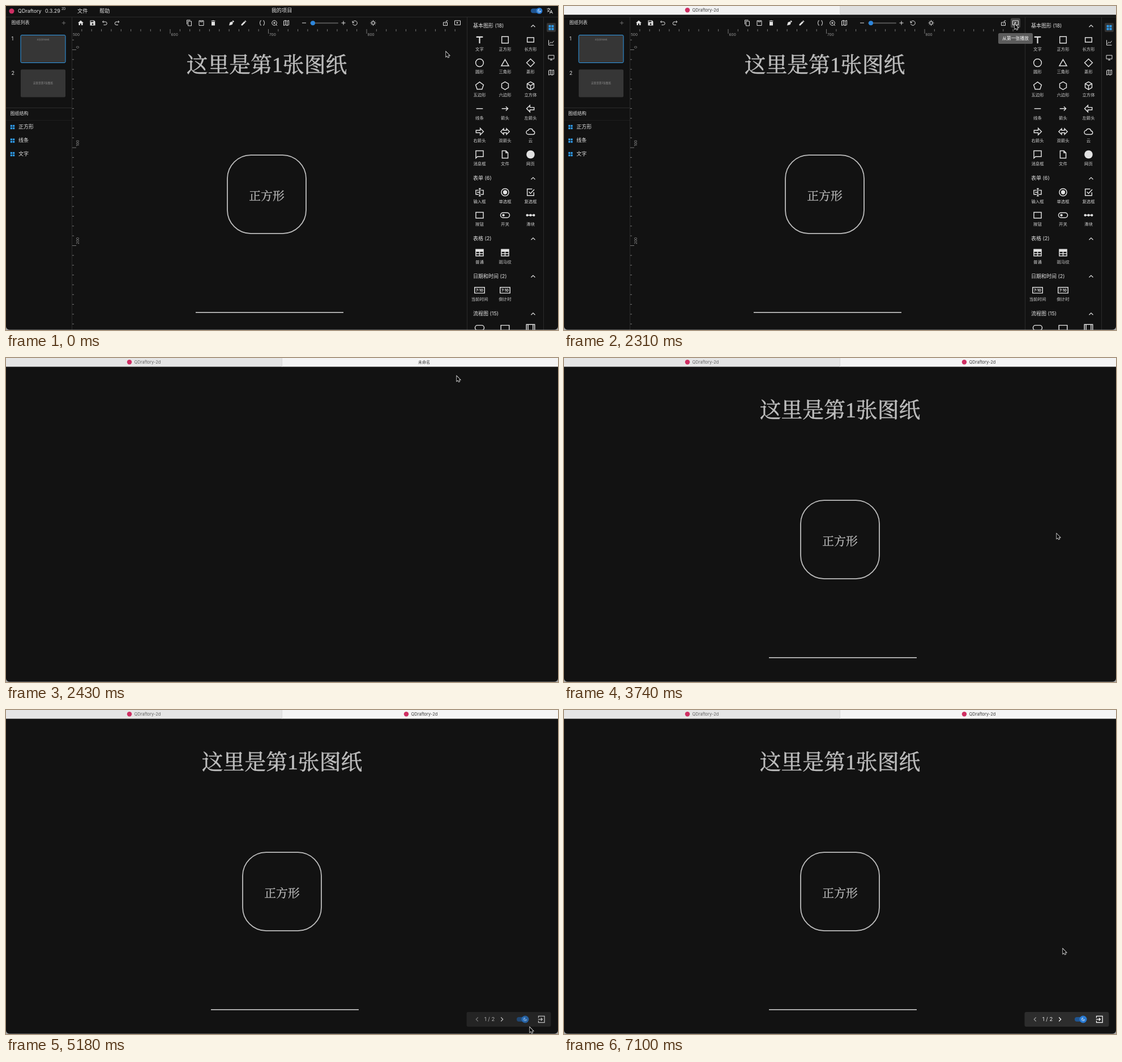
An HTML page with a canvas for the animation above (8000 ms loop, 975 by 574 pixels).

```html
<!DOCTYPE html>
<html lang="zh-CN">
<head>
<meta charset="utf-8">
<style>
html, body { margin: 0; width: 100%; height: 100%; overflow: hidden; background: #121212; }
canvas { display: block; }
</style>
</head>
<body>
<canvas id="stage" width="975" height="574"></canvas>
<script>
const ctx = document.getElementById('stage').getContext('2d');
const LOOP = 8000, W = 975, H = 574, TAB_HEIGHT = 15.6;
const SANS = 'Inter, "Noto Sans CJK SC", "Noto Sans CJK", sans-serif';
const SERIF = '"Liberation Serif", "Noto Serif CJK SC", "Noto Sans CJK SC", serif';
const APP = 'QDraftory', BRAND = '#cf2f63', BG = '#121212', LINE = '#2b2b2b', INK = '#e2e2e2', BLUE = '#2f9bea';

const pill = 'M7 6h10a6 6 0 0 1 0 12H7a6 6 0 0 1 0-12z';
const hexagon = 'M12 2.5l8.2 4.75v9.5L12 21.5l-8.2-4.75v-9.5z';
const ring = r => `M${12 - r} 12a${r} ${r} 0 1 0 ${2 * r} 0a${r} ${r} 0 1 0 ${-2 * r} 0`;

// Icons on a 24-unit grid; one name may have both a stroked and a filled part.
const OUTLINE = {
  undo: 'M8 4L4 8l4 4M4 8h10a5.5 5.5 0 0 1 0 11H8',
  redo: 'M16 4l4 4-4 4M20 8H10a5.5 5.5 0 0 0 0 11h6',
  copy: 'M16 2H4v15M8 6h12v16H8z',
  paste: 'M4 4h16v17H4zM8 4v4h8V4',
  braces: 'M9 4H7a2 2 0 0 0-2 2v4l-2 2 2 2v4a2 2 0 0 0 2 2h2M15 4h2a2 2 0 0 1 2 2v4l2 2-2 2v4a2 2 0 0 1-2 2h-2',
  zoom: ring(8.5) + 'M12 8v8M8 12h8M18 18l4 4',
  map: 'M3 5l6-2 6 2 6-2v16l-6 2-6-2-6 2zM9 3v16M15 5v16',
  minus: 'M5 12h14',
  plus: 'M5 12h14M12 5v14',
  refresh: 'M4 5v6h6M5 10a8 8 0 1 1 0 5',
  gear: ring(5) + 'M12 2v5M12 17v5M2 12h5M17 12h5M5 5l3.5 3.5M15.5 15.5L19 19M5 19l3.5-3.5M15.5 8.5L19 5',
  unlock: 'M5 10h14v11H5zM15 10V6a3.5 3.5 0 0 1 6-1M12 14v3',
  present: 'M2 4h20v15H2z',
  translate: 'M2 5h12M8 2v3M12 5c-1 5-5 9-9 11M4 9c2 4 5 6 8 7M12 22l5-12 5 12M14 18h6',
  chart: 'M3 3v18h18M6 16l5-6 4 4 6-8',
  monitor: 'M2 4h20v13H2zM8 21h8M12 17v4',
  exit: 'M4 8V3h17v18H4v-5M3 12h12M11 8l4 4-4 4',
  up: 'M6 15l6-6 6 6', left: 'M15 6l-6 6 6 6', right: 'M9 6l6 6-6 6',
  moon: 'M11 4a8 8 0 1 0 9 9a5.5 5.5 0 0 1-9-9z',
  square: 'M4 4h16v16H4z', oblong: 'M4 6.5h16v11H4z', circle: ring(9.5),
  triangle: 'M12 4L21 19.5H3z', diamond: 'M12 2.5l9.5 9.5-9.5 9.5L2.5 12z',
  pentagon: 'M12 3l9.5 7-3.6 10.5H6.1L2.5 10z', hexagon,
  cube: hexagon + 'M3.8 7.2L12 12l8.2-4.8M12 12v9.5',
  line: 'M4 12h16', arrow: 'M4 12h15M14 7l5 5-5 5',
  arrowLeft: 'M2.5 12l8-8v5h10v6h-10v5z', arrowRight: 'M21.5 12l-8-8v5h-10v6h10v5z',
  arrowBoth: 'M1.5 12l7-7v4h7V5l7 7-7 7v-4h-7v4z',
  cloud: 'M7 19a5 5 0 0 1-.5-10A6 6 0 0 1 18 10.5a4.3 4.3 0 0 1 .5 8.5z',
  message: 'M3 3h18v14H7l-4 4z', file: 'M5 3h9l5 5v13H5zM14 3v5h5',
  input: 'M10 7H3v10h7M15 7h6v10h-6M12.5 3v18M10 3h5M10 21h5M6 12h6',
  radio: ring(9), check: 'M20 12v8H4V4h12M8 11l4 4 9-10', button: 'M3 5h18v14H3z',
  toggle: pill, slider: 'M2 12h20', table: 'M3 4h18v16H3zM3 9h18M12 9v11M3 14.5h18',
  clock: 'M0 5h24v14H0z', terminal: pill, process: 'M2 6h20v12H2z',
  subprocess: 'M2 4h20v16H2zM6 4v16M18 4v16'
};
const SOLID = {
  home: 'M10 20v-6h4v6h5v-8h3L12 3 2 12h3v8z',
  save: 'M3 3h14l4 4v14H3zM5 5v4h10V5zM9 16a3 3 0 1 0 6 0a3 3 0 1 0-6 0',
  trash: 'M6 8h12v13H6zM5 4h4l1-1h4l1 1h4v2H5z',
  nib: 'M3 21l3-11 7-3 4 4-3 7zM14 6l3-3 4 4-3 3z',
  pencil: 'M3 21v-4L14 6l4 4L7 21zM15 5l2-2 4 4-2 2z',
  present: 'M9 8v7l6-3.5z',
  grid: 'M3 3h8v8H3zM13 3h8v8h-8zM3 13h8v8H3zM13 13h8v8h-8z',
  text: 'M4 3.5v3h6.5v14h3v-14H20v-3z', web: ring(10), radio: ring(5),
  toggle: 'M5 12a3 3 0 1 0 6 0a3 3 0 1 0-6 0',
  slider: 'M1 12a3 3 0 1 0 6 0a3 3 0 1 0-6 0M9 12a3 3 0 1 0 6 0a3 3 0 1 0-6 0M17 12a3 3 0 1 0 6 0a3 3 0 1 0-6 0',
  table: 'M3 4h18v5H3z'
};

const PALETTE = [
  [35.5, '基本图形 (18)', 'text 文字 square 正方形 oblong 长方形 circle 圆形 triangle 三角形 diamond 菱形 ' +
    'pentagon 五边形 hexagon 六边形 cube 立方体 line 线条 arrow 箭头 arrowLeft 左箭头 arrowRight 右箭头 ' +
    'arrowBoth 双箭头 cloud 云 message 消息框 file 文件 web 网页'],
  [305.5, '表单 (6)', 'input 输入框 radio 单选框 check 复选框 button 按钮 toggle 开关 slider 滑块'],
  [412.5, '表格 (2)', 'table 普通 table 斑马纹'],
  [479, '日期和时间 (2)', 'clock 当前时间 clock 倒计时'],
  [545.5, '流程图 (15)', 'terminal 开始 process 流程 subprocess 子流程']
];
const TOOLS = { home: 132, save: 153, undo: 174.5, redo: 196, copy: 323.5, paste: 345, trash: 366, nib: 398.5,
  pencil: 420, braces: 452.5, zoom: 474, map: 495, minus: 526.5, plus: 596, refresh: 616, gear: 648.5,
  unlock: 776, present: 797.5 };

// Pointer track: time, x, y
const TRACK = [[0, 777, 81], [60, 777, 81], [560, 796, 32], [2520, 796, 32], [3100, 888, 276], [3340, 869, 296],
  [3550, 869, 296], [3740, 870, 311], [3950, 874, 375], [4150, 888, 448], [4350, 911, 520], [4670, 925, 562],
  [5630, 925, 562], [5660, 925, 561], [5840, 925, 561], [6640, 925, 501], [7100, 881, 423], [LOOP, 881, 423]];

const ramp = (t, from, to) => Math.min(1, Math.max(0, (t - from) / (to - from)));

function rect(x, y, w, h, fill, radius = 0, stroke) {
  ctx.beginPath();
  ctx.roundRect(x, y, w, h, radius);
  if (fill) { ctx.fillStyle = fill; ctx.fill(); }
  if (stroke) { ctx.strokeStyle = stroke; ctx.stroke(); }
}
function disc(x, y, r, fill) {
  ctx.beginPath();
  ctx.arc(x, y, r, 0, 7);
  ctx.fillStyle = fill;
  ctx.fill();
}
function text(str, x, y, size, color = INK, align = 'left', family = SANS, weight = 400) {
  ctx.font = `${weight} ${size}px ${family}`;
  ctx.textAlign = align;
  ctx.textBaseline = 'middle';
  ctx.fillStyle = color;
  ctx.fillText(str, x, y);
}
function icon(name, x, y, size, color = INK) {
  ctx.save();
  ctx.translate(x - size / 2, y - size / 2);
  ctx.scale(size / 24, size / 24);
  ctx.lineWidth = 2;
  ctx.strokeStyle = ctx.fillStyle = color;
  if (OUTLINE[name]) ctx.stroke(new Path2D(OUTLINE[name]));
  if (SOLID[name]) ctx.fill(new Path2D(SOLID[name]), 'evenodd');
  ctx.restore();
}
function toggle(x, y, r) {
  rect(x - 15, y - 4, 16, 8, '#1f5591', 4);
  disc(x, y, r, '#2a7bd3');
  icon('moon', x, y, 8, '#fff');
}

function drawing(dx, dy) {
  const color = '#bebebe';
  // A hairline stroke gives the serif text its sturdier weight.
  const caption = (str, y, size) => {
    text(str, 460.5, y, size, color, 'center', SERIF, 500);
    ctx.lineWidth = size / 70;
    ctx.strokeText(str, 460.5, y);
  };
  ctx.save();
  ctx.translate(dx, dy);
  ctx.strokeStyle = color;
  ctx.lineJoin = 'round';
  caption('这里是第1张图纸', 107.5, 37.8);
  caption('正方形', 339, 20.8);
  ctx.lineWidth = 1.8;
  rect(391, 264.1, 139, 139, null, 41.6, color);
  rect(335, 542, 261, 1.8, color);
  ctx.restore();
}

function rulers() {
  const step = 17.35, color = '#777';
  for (let n = 0; n < 40; n++) {
    const x = 116 + n * step;
    if (x < 812) rect(x, 41, 1, n % 10 ? 4 : 8, color);
    if (n % 10 == 0) text(500 + n * 10, x + 2, 51.5, 6.5, '#999');
  }
  for (let n = -1; n < 29; n++) {
    const y = 77 + n * step;
    rect(116, y, n % 10 ? 4 : 8, 1, color);
    if (n % 10) continue;
    ctx.save();
    ctx.translate(127, y - 2);
    ctx.rotate(-Math.PI / 2);
    text(n * 10, 0, 0, 6.5, '#999');
    ctx.restore();
  }
}

function sidebar() {
  text('图纸列表', 9.5, 30, 8);
  icon('plus', 102, 30, 11, '#777');
  ctx.lineWidth = 1;
  [[51, '1', 60, 3], [112, '2', 137, 4.6]].forEach(([y, n, ty, size], i) => {
    text(n, 9.5, y + 7, 9);
    rect(26, y + .5, 79, 49, '#363636', 2, i ? null : BLUE);
    text(`这里是第${n}张图纸`, 65.5, ty, size, '#8b8b8b', 'center');
  });
  text('图纸结构', 7.5, 191, 8);
  ['正方形', '线条', '文字'].forEach((name, i) => {
    icon('grid', 11.5, 214.5 + i * 24, 10, BLUE);
    text(name, 22, 214.5 + i * 24, 9);
  });
}

function palette() {
  for (const [top, title, items] of PALETTE) {
    text(title, 825, top, 9);
    icon('up', 931, top, 14);
    const words = items.split(' ');
    for (let i = 0; i < words.length / 2; i++) {
      const x = 836.5 + i % 3 * 45, y = top + 24.5 + Math.floor(i / 3) * 40.6;
      icon(words[2 * i], x, y, 17.5);
      if (words[2 * i] == 'clock') text('7:10', x, y + .3, 6.5, INK, 'center', SANS, 700);
      text(words[2 * i + 1], x, y + 16.5, 7.4, '#d2d2d2', 'center');
    }
  }
}

function editor(t) {
  rect(0, 0, W, H, BG);
  disc(10, 9, 4.5, BRAND);
  text(APP, 21, 9, 9);
  text('0.3.29', 69, 9, 9);
  text('2D', 98, 5, 5.5);
  text('文件', 126, 9, 9.3);
  text('帮助', 165, 9, 9.3);
  text('我的项目', 487, 8, 9.2, INK, 'center');
  toggle(942, 8.5, 5.5);
  icon('translate', 960.5, 8.5, 12);

  rulers();
  drawing(0, 0);
  if (t > 480) rect(789, 21.5, 17, 17, '#444', 2);
  for (const name in TOOLS) icon(name, TOOLS[name], 30, 12);
  rect(537, 29.3, 50, 2, '#555', 1);
  disc(542, 30.3, 4, '#2d86dc');
  sidebar();
  palette();

  rect(0, 19, W, 1, LINE);
  rect(0, 180, 116, 1, LINE);
  rect(0, 202, 116, 1, '#1e1e1e');
  for (const x of [116, 814, 949]) rect(x, 20, 1, H, LINE);
  rect(955, 30, 16, 16, '#333', 2);
  ['grid', 'chart', 'monitor', 'map'].forEach((name, i) =>
    icon(name, 963, 38.3 + i * 26.5, 12, i ? INK : BLUE));

  ctx.globalAlpha = ramp(t, 600, 800);
  rect(767, 48, 61, 19, '#5c5c5c', 2.5);
  text('从第一张播放', 797.5, 57.5, 7.8, '#fff', 'center');
  ctx.globalAlpha = 1;
}

function tabs(t) {
  const switched = t >= 2340;
  rect(0, 0, 487, TAB_HEIGHT, switched ? '#e5e5e5' : '#f2f2f2');
  rect(487, 0, 488, TAB_HEIGHT, switched ? '#f4f4f4' : '#dedede');
  rect(487, 0, 1, TAB_HEIGHT, '#dadada');
  const label = (x, color) => {
    disc(x, 7.3, 4.2, BRAND);
    text(APP + '-2d', x + 8.5, 7.3, 7.5, color);
  };
  label(218, switched ? '#626262' : '#3c3c3c');
  if (!switched) return;
  if (t < 2520) text('未命名', 738.5, 7.5, 7.2, '#3c3c3c', 'center');
  else label(707, '#3c3c3c');
}

function pager(t) {
  ctx.globalAlpha = .7 * ramp(t, 4380, 4670) + .3 * ramp(t, 5840, 6140);
  rect(813.5, 535, 149, 26, '#2d2d2d', 3);
  icon('left', 832, 548, 14, '#999');
  text('1 / 2', 854, 548.5, 9.5, INK, 'center');
  icon('right', 876, 548, 14, '#fff');
  toggle(917, 548, 6.5);
  icon('exit', 945.5, 548, 15, '#fff');
  ctx.globalAlpha = 1;
}

function preview(t) {
  const blank = t < 2430;
  rect(0, 0, W, H, blank ? '#fefefe' : BG);
  if (blank) rect(0, 16, W, 1, '#d2d2d2');
  if (t >= 2760) drawing(27, -12);
  pager(t);
}

// Monotone cubic interpolation keeps the pointer from overshooting its rests.
function along(t, axis) {
  const i = Math.max(1, TRACK.findIndex(key => key[0] > t));
  const slope = k => (TRACK[k + 1][axis] - TRACK[k][axis]) / (TRACK[k + 1][0] - TRACK[k][0]);
  const tangent = k => {
    if (k == 0 || k == TRACK.length - 1) return 0;
    const a = slope(k - 1), b = slope(k);
    return a * b > 0 ? 2 * a * b / (a + b) : 0;
  };
  const [p, q] = [TRACK[i - 1], TRACK[i]], d = q[0] - p[0], u = (t - p[0]) / d, v = 1 - u;
  return p[axis] * v * v * (1 + 2 * u) + q[axis] * u * u * (3 - 2 * u)
    + d * u * v * (tangent(i - 1) * v - tangent(i) * u);
}

const ARROW = new Path2D('M0 0v8.6l2-1.8 1.4 3.1 1.5-.6-1.4-3h2.6z');
function pointer(t) {
  ctx.save();
  ctx.translate(along(t, 1) + .2, along(t, 2) + .2);
  ctx.lineWidth = 1.5;
  ctx.strokeStyle = '#f4f4f4';
  ctx.stroke(ARROW);
  ctx.fillStyle = '#000';
  ctx.fill(ARROW);
  ctx.restore();
}

function windowCorners() {
  ctx.beginPath();
  ctx.rect(0, 500, W, 74);
  ctx.roundRect(0, 500, W, 73.5, [0, 0, 6, 6]);
  ctx.fillStyle = '#a5a5a5';
  ctx.fill('evenodd');
}

function frame(now) {
  const t = now % LOOP;
  if (t < 2340) editor(t);
  else preview(t);
  if (t >= 2310) tabs(t);
  windowCorners();
  pointer(t);
  requestAnimationFrame(frame);
}
requestAnimationFrame(frame);
</script>
</body>
</html>
```
